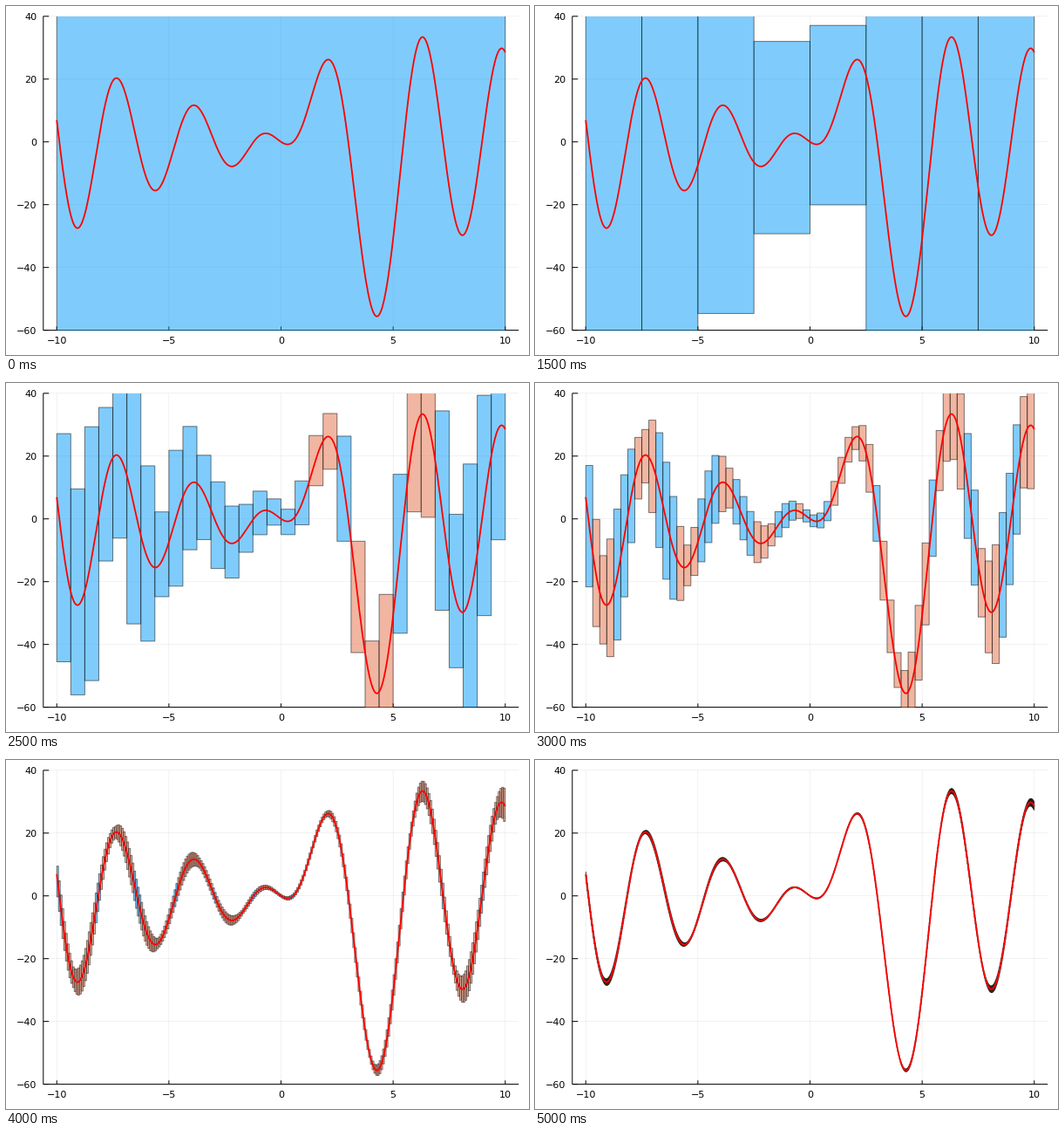
A matplotlib script for the animation above (5.5 s loop, 600 px wide and 400 px high).

```python
import numpy as np
import matplotlib.pyplot as plt
from matplotlib.animation import FuncAnimation
from matplotlib.collections import PolyCollection

W, H, DPI = 600, 400, 100
LEFT, RIGHT, TOP, BOTTOM = 42.8, 588.19, 11.81, 371.6
PX = 72 / DPI  # points per pixel
STEPS = 11
BLUE = (0.0, 0.6056, 0.9787, 0.5)
SALMON = (0.8889, 0.4356, 0.2781, 0.5)
EDGE = (0, 0, 0, 0.5)


def f(x):
    return -sum(k * x * np.sin(k * (x - 3) / 3) for k in range(1, 6))


def isin(lo, hi):
    """Sine of the intervals [lo, hi]."""
    def hits(phase):
        turn = 2 * np.pi
        return np.floor((hi - phase) / turn) >= np.ceil((lo - phase) / turn)

    a, b = np.sin(lo), np.sin(hi)
    low = np.where(hits(-np.pi / 2), -1, np.minimum(a, b))
    high = np.where(hits(np.pi / 2), 1, np.maximum(a, b))
    return low, high


def imul(a, b):
    products = [p * q for p in a for q in b]
    return np.min(products, axis=0), np.max(products, axis=0)


def enclose(lo, hi):
    """Interval extension of f."""
    low, high = 0, 0
    for k in range(1, 6):
        s = isin(k * (lo - 3) / 3, k * (hi - 3) / 3)
        a, b = imul((k * lo, k * hi), s)
        low, high = low - b, high - a
    return low, high


def boxes(n):
    edges = np.linspace(-10, 10, n + 1)
    x0, x1 = edges[:-1], edges[1:]
    y0, y1 = enclose(x0, x1)
    clear = (y0 > 0) | (y1 < 0)
    order = np.argsort(clear, kind="stable")
    corners = np.stack([np.stack(p, axis=-1) for p in
                        ((x0, y0), (x1, y0), (x1, y1), (x0, y1))], axis=1)
    return corners[order], [SALMON if c else BLUE for c in clear[order]]


fig = plt.figure(figsize=(W / DPI, H / DPI), dpi=DPI, facecolor="white")
ax = fig.add_axes([LEFT / W, 1 - BOTTOM / H, (RIGHT - LEFT) / W, (BOTTOM - TOP) / H])
ax.set_xlim(-10.6, 10.6)
ax.set_ylim(-60, 40)
ax.axis("off")


def rule(xs, ys, width=1, alpha=1, z=1):
    ax.plot(xs, ys, color="black", lw=width * PX, alpha=alpha, zorder=z,
            clip_on=False, snap=False, solid_capstyle="butt")


def label(value, x, y, dx, dy, align):
    ax.annotate(str(value).replace("-", "\u2212"), (x, y), (dx * PX, dy * PX),
                textcoords="offset points", ha=align, va="baseline",
                fontsize=8, family="DejaVu Sans", annotation_clip=False)


for x in range(-10, 11, 5):
    rule([x, x], [-60, 40], 0.5, 0.1, 0)
    rule([x, x], [-60, -58.8])
    label(x, x, -60, 0, -15.5, "center")
for y in range(-60, 41, 20):
    rule([-10.6, 10.6], [y, y], 0.5, 0.1, 0)
    rule([-10.6, -10.35], [y, y])
    label(y, -10.6, y, -7.3, -4.1, "right")
rule([-10.6, 10.6], [-60, -60])
rule([-10.6, -10.6], [-60, 40])

shapes = PolyCollection([], edgecolors=[EDGE], linewidths=PX, zorder=2, snap=False)
ax.add_collection(shapes, autolim=False)
xs = np.linspace(-10, 10, 1001)
ax.plot(xs, f(xs), color="red", lw=1.8 * PX, zorder=3, solid_capstyle="butt")


def update(i):
    verts, fills = boxes(2 ** i)
    shapes.set_verts(verts)
    shapes.set_facecolor(fills)
    return [shapes]


anim = FuncAnimation(fig, update, frames=STEPS, interval=500, repeat=True, repeat_delay=0)
plt.show()
```
